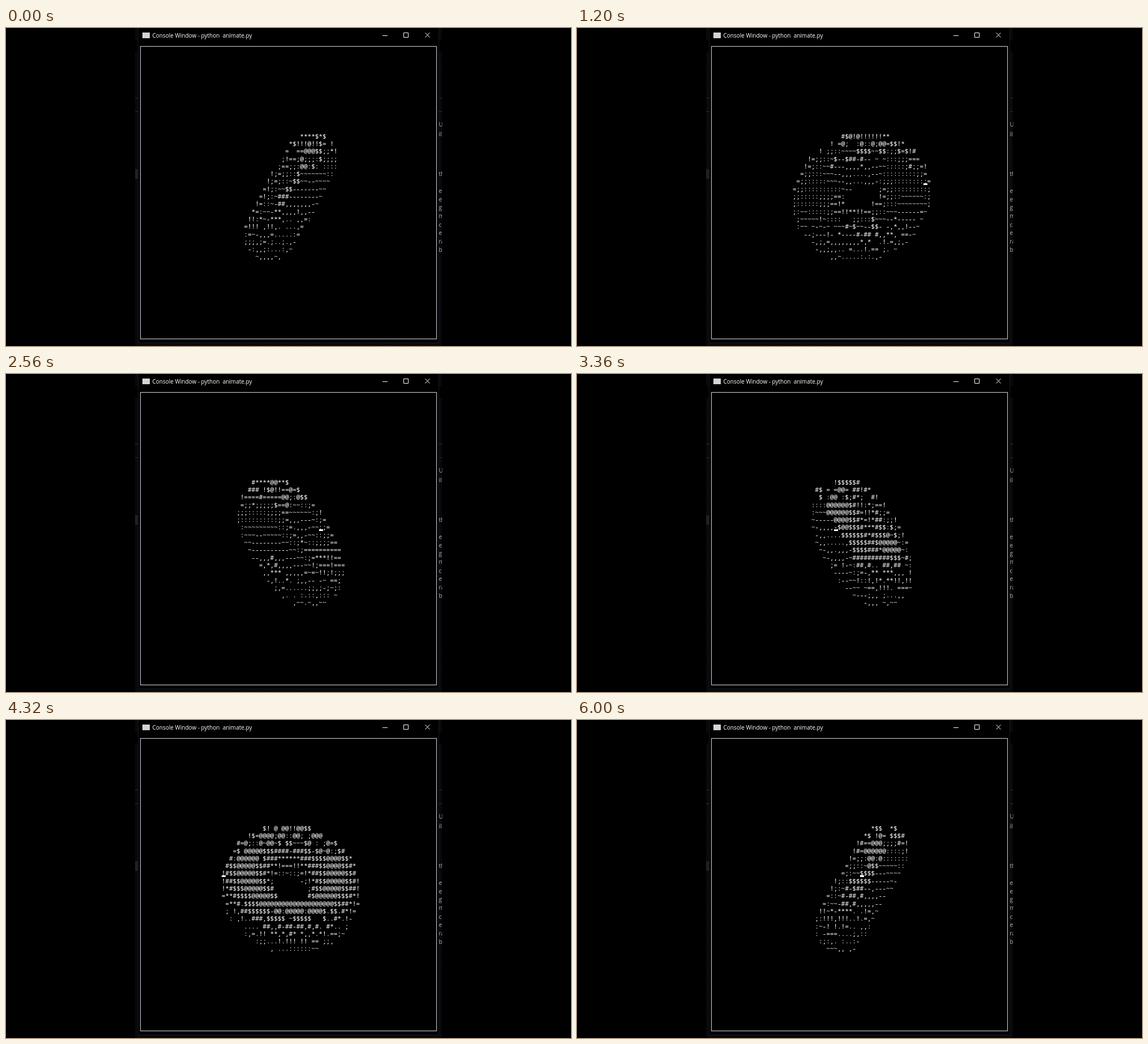
Write an HTML page with a canvas that moves like this. It is 998 by 561 pixels and loops after 6.08 s.

```html
<!DOCTYPE html>
<html lang="en">
<head>
<meta charset="utf-8">
<title>Spinning torus</title>
<style>
  html, body { margin: 0; width: 100%; height: 100%; overflow: hidden; background: #000; }
  svg, canvas { position: absolute; left: 0; top: 0; }
  text { white-space: pre; font-family: "Open Sans", "Noto Sans", sans-serif; }
</style>
</head>
<body>
<svg width="998" height="561" viewBox="0 0 998 561">
  <defs>
    <pattern id="weave" width="4" height="4" patternUnits="userSpaceOnUse">
      <rect width="4" height="4" fill="#050508"/>
      <path d="M0 .5H2M2 2.5H4" stroke="#12121b"/>
    </pattern>
    <clipPath id="edge"><rect x="764" width="6.5" height="561"/></clipPath>
  </defs>
  <path d="M228 0H234V22H228ZM228 42H234V561H228ZM764 0H770V22H764ZM764 42H770V561H764ZM234 555H764V561H234Z" fill="url(#weave)"/>
  <path d="M228 123.5H234M228 147.5H234M764 123.5H770M764 147.5H770" stroke="#35311a"/>
  <rect x="228" y="249" width="6" height="17" fill="#202024"/>
  <path d="M233.5 0V555.5H764.5V0" fill="none" stroke="#17171c"/>
  <g id="behind" clip-path="url(#edge)" fill="#b4b4b4" font-size="10"></g>
  <rect x="241" y="8" width="13" height="10" fill="#d4d4d4"/>
  <text x="258.5" y="16.7" fill="#fff" font-size="10">Console Window - python  animate.py</text>
  <path d="M665 13.5H674M702.5 8.5H710.5V16.5H702.5ZM740.5 8.5L748.5 16.5M748.5 8.5L740.5 16.5" fill="none" stroke="#fff"/>
  <rect x="237.5" y="32.5" width="523" height="516" fill="none" stroke="#b9bdc4" stroke-width="1.2"/>
</svg>
<canvas id="stage" width="998" height="561"></canvas>
<script>
const LOOP = 6080, STEP = 80, TAU = Math.PI * 2;
const CELL_W = 6.6, CELL_H = 13.3, CX = 503, CY = 297;
const RING = 79, TUBE = 40.5, TILT = Math.PI / 6, START = 93.5 * Math.PI / 180;
const COLS = 41, ROWS = 17, RAMP = ".,-~:;=!*#$@";
const ctx = document.getElementById("stage").getContext("2d");

// Slivers of the window behind: letters and baselines
const slivers = { U: [174], il: [191], th: [261], e: [291, 306, 365], g: [320], m: [335], c: [351], ra: [380], b: [395] };
document.getElementById("behind").innerHTML = Object.entries(slivers)
  .flatMap(([s, ys]) => ys.map(y => `<text x="764.5" y="${y}">${s}</text>`)).join("");

function noise(a, b, c) {
  const v = Math.sin(a * 12.9898 + b * 78.233 + c * 37.719) * 43758.5453;
  return v - Math.floor(v);
}

// Nearest and farthest surface point for each character cell
function scan(angle) {
  const sa = Math.sin(TILT), ca = Math.cos(TILT), s = Math.sin(angle), c = Math.cos(angle);
  const axis = [-ca * s, sa, ca * c], u = [c, 0, s], v = [sa * s, ca, -sa * c];
  const cells = new Array(COLS * ROWS);
  for (let p = 0; p < TAU; p += 0.03) {
    const cp = Math.cos(p), sp = Math.sin(p);
    const out = u.map((k, i) => k * cp + v[i] * sp);
    for (let t = 0; t < TAU; t += 0.06) {
      const ct = Math.cos(t), st = Math.sin(t);
      const [x, y, z] = out.map((k, i) => k * (RING + TUBE * ct) + axis[i] * TUBE * st);
      const line = Math.round(y / CELL_H);
      if (Math.abs(y / CELL_H - line) > 0.36) continue;
      const col = Math.round(x / CELL_W) + 20, row = 8 - line;
      const light = (out[1] * ct + axis[1] * st + out[2] * ct + axis[2] * st) * Math.SQRT1_2;
      const cell = cells[row * COLS + col] ??= { near: -1e3, far: 1e3 };
      if (z > cell.near) { cell.near = z; cell.front = light; }
      if (z < cell.far) { cell.far = z; cell.back = light; }
    }
  }
  return { cells, axis };
}

function draw(frame) {
  const turn = frame * STEP / LOOP * TAU;
  const { cells, axis } = scan(START + turn);
  ctx.clearRect(0, 0, 998, 561);
  ctx.fillStyle = "#fff";
  ctx.font = '500 11.5px "Noto Sans Mono", "DejaVu Sans Mono", monospace';
  ctx.textAlign = "center";
  cells.forEach((cell, i) => {
    const col = i % COLS - 20, row = Math.floor(i / COLS);
    // The surface is sampled thinly towards top and bottom: gaps and the other layer show
    const thin = Math.max(0, Math.min(0.36, (Math.abs(row - 7) - 2.5) * 0.12));
    const chance = noise(col, row, frame);
    if (chance < thin * 0.25) return;
    // Depth is judged along the torus axis, so the far side can win
    const along = axis[0] * col * CELL_W + axis[1] * (8 - row) * CELL_H
      + (noise(row, frame, col) - 0.5) * 14;
    const front = along > -4 - 55 * axis[2] && along < 18 + 100 * axis[2];
    const light = front !== chance > 1 - thin ? cell.front : cell.back;
    const level = Math.max(0, Math.min(11, Math.round(5.5 + 5.5 * light)));
    ctx.fillText(RAMP[level], CX + col * CELL_W, CY + 4 + (row - 8) * CELL_H);
  });
  if (frame) {
    const x = CX + Math.round(18 * Math.sin(turn + 0.06)) * CELL_W;
    ctx.fillRect(Math.round(x - 3.3), 274, 7, 3);
  }
}

let shown = -1;
function tick() {
  const frame = Math.floor(performance.now() % LOOP / STEP);
  if (frame !== shown) draw(shown = frame);
  requestAnimationFrame(tick);
}
tick();
</script>
</body>
</html>
```
